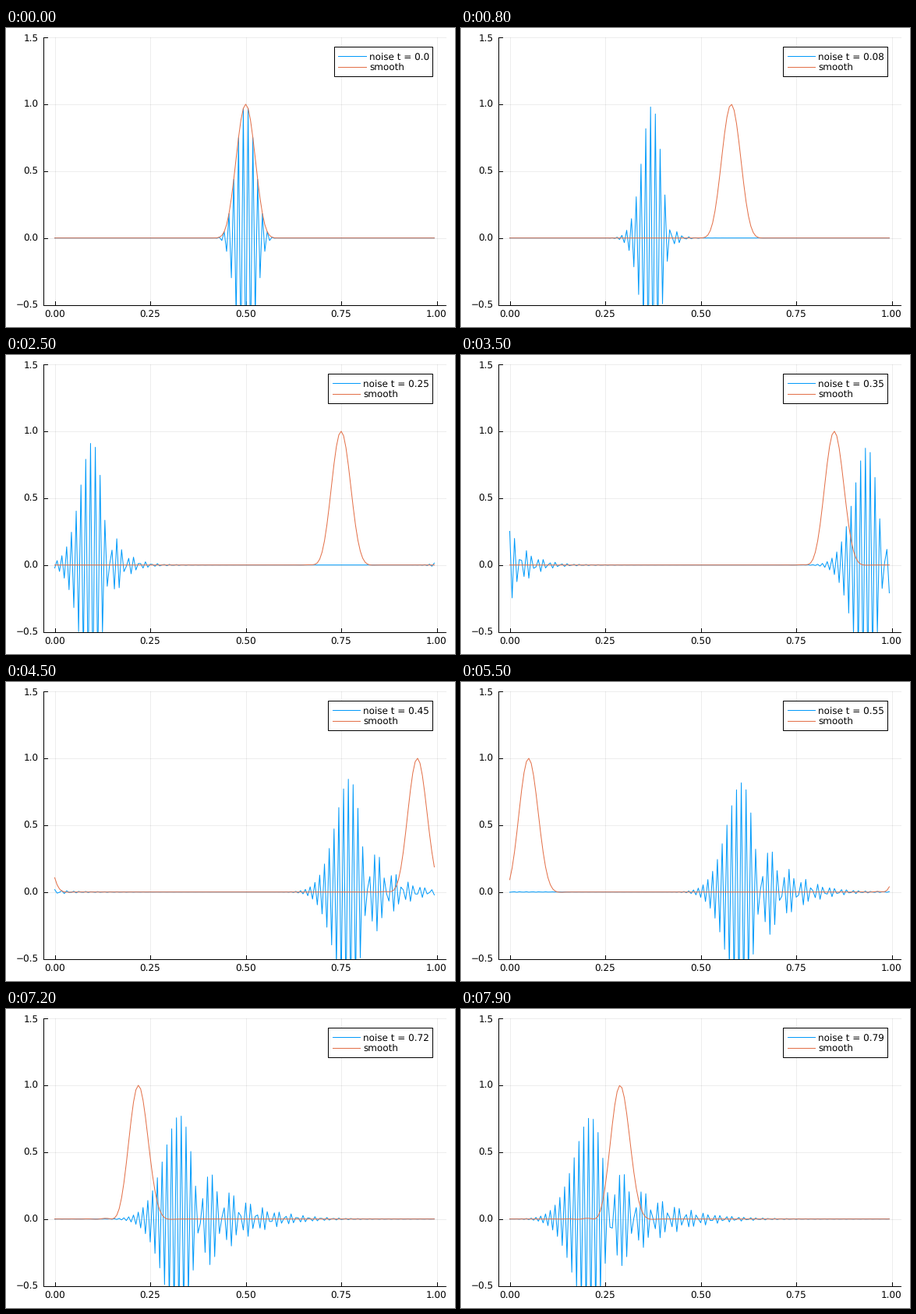
A matplotlib script that plays this animation: 576 px wide and 384 px high, repeating every 8000 ms.

```python
import numpy as np
import matplotlib.pyplot as plt
from matplotlib.animation import FuncAnimation
from matplotlib.patches import Rectangle

plt.rcParams.update({
    "font.family": "DejaVu Sans",
    "font.size": 12,
    "text.hinting": "none",
    "path.simplify": False,
})

W, H = 576, 384
FRAMES, INTERVAL, DT = 80, 100, 0.01
BLUE, ORANGE = "#009AFA", "#E36F47"
LEFT, RIGHT, TOP, BOTTOM = 48, 564, 12, 355.6

# Advection u_t + u_x = 0 on a periodic grid, fourth-order central differences
N = 160
grid = np.arange(N) / N
bump = np.clip(1 - ((grid - 0.5) / 0.1) ** 2, 0, None) ** 8
sawtooth = -bump * (-1.0) ** np.arange(N)
k = 2 * np.pi * np.fft.fftfreq(N)
omega = N * (8 * np.sin(k) - np.sin(2 * k)) / 6


def advect(u0, t):
    return np.fft.ifft(np.fft.fft(u0) * np.exp(-1j * omega * t)).real


def px(x):
    return 62.5 + 490 * x


def py(u):
    return 269.7 - 171.8 * u


fig = plt.figure(figsize=(W / 72, H / 72), dpi=72, facecolor="white")
ax = fig.add_axes([0, 0, 1, 1])
ax.set_xlim(0, W)
ax.set_ylim(H, 0)
ax.axis("off")


def line(xs, ys, color="black", lw=1.0, **kw):
    return ax.plot(xs, ys, color=color, lw=lw, **kw)[0]


def label(x, y, s, ha="left", **kw):
    return ax.text(x, y + 4.4, s, ha=ha, va="baseline", **kw)


# Grid, ticks and tick labels
for x in np.linspace(0, 1, 5):
    line([px(x)] * 2, [TOP, BOTTOM], alpha=0.07, zorder=1)
    line([px(x)] * 2, [BOTTOM, BOTTOM - 5], zorder=2)
    label(px(x), 367.4, f"{x:.2f}", ha="center")
for u in np.linspace(-0.5, 1.5, 5):
    line([LEFT, RIGHT], [py(u)] * 2, alpha=0.07, zorder=1)
    line([LEFT, LEFT + 5], [py(u)] * 2, zorder=2)
    label(41.7, py(u), f"{u:.1f}".replace("-", "\u2212"), ha="right")
line([LEFT, LEFT], [TOP, BOTTOM], zorder=2)
line([LEFT, RIGHT], [BOTTOM, BOTTOM], zorder=2)

# Curves, clipped to the plot area
area = Rectangle((LEFT, TOP), RIGHT - LEFT, BOTTOM - TOP,
                 transform=ax.transData)
noise = line(px(grid), py(sawtooth), BLUE, zorder=3)
smooth = line(px(grid), py(bump), ORANGE, zorder=4)
for curve in (noise, smooth):
    curve.set_clip_path(area)

# Legend; its right edge is fixed and it grows to the left
box = Rectangle((421, 23.5), 126, 38.5, fc="white", ec="black", lw=1, zorder=5)
ax.add_patch(box)
ROWS = (36.4, 49.5)
keys = [line([], [], c, zorder=6) for c in (BLUE, ORANGE)]
names = [label(466, y, s, zorder=6) for y, s in zip(ROWS, ("", "smooth"))]
DIGIT = 0.636 * 12


def update(i):
    t = round(i * DT, 2)
    noise.set_ydata(py(advect(sawtooth, t)))
    smooth.set_ydata(py(advect(bump, t)))

    stamp = str(t)
    start = 466 - DIGIT * (len(stamp) - 3)
    names[0].set_text(f"noise t = {stamp}")
    box.set_x(start - 45)
    box.set_width(547 - start + 45)
    for key, name, y in zip(keys, names, ROWS):
        key.set_data([start - 39.8, start - 4.4], [y, y])
        name.set_x(start)
    return [noise, smooth, box, *keys, *names]


anim = FuncAnimation(fig, update, frames=FRAMES, interval=INTERVAL,
                     repeat=True, repeat_delay=0)
plt.show()
```
